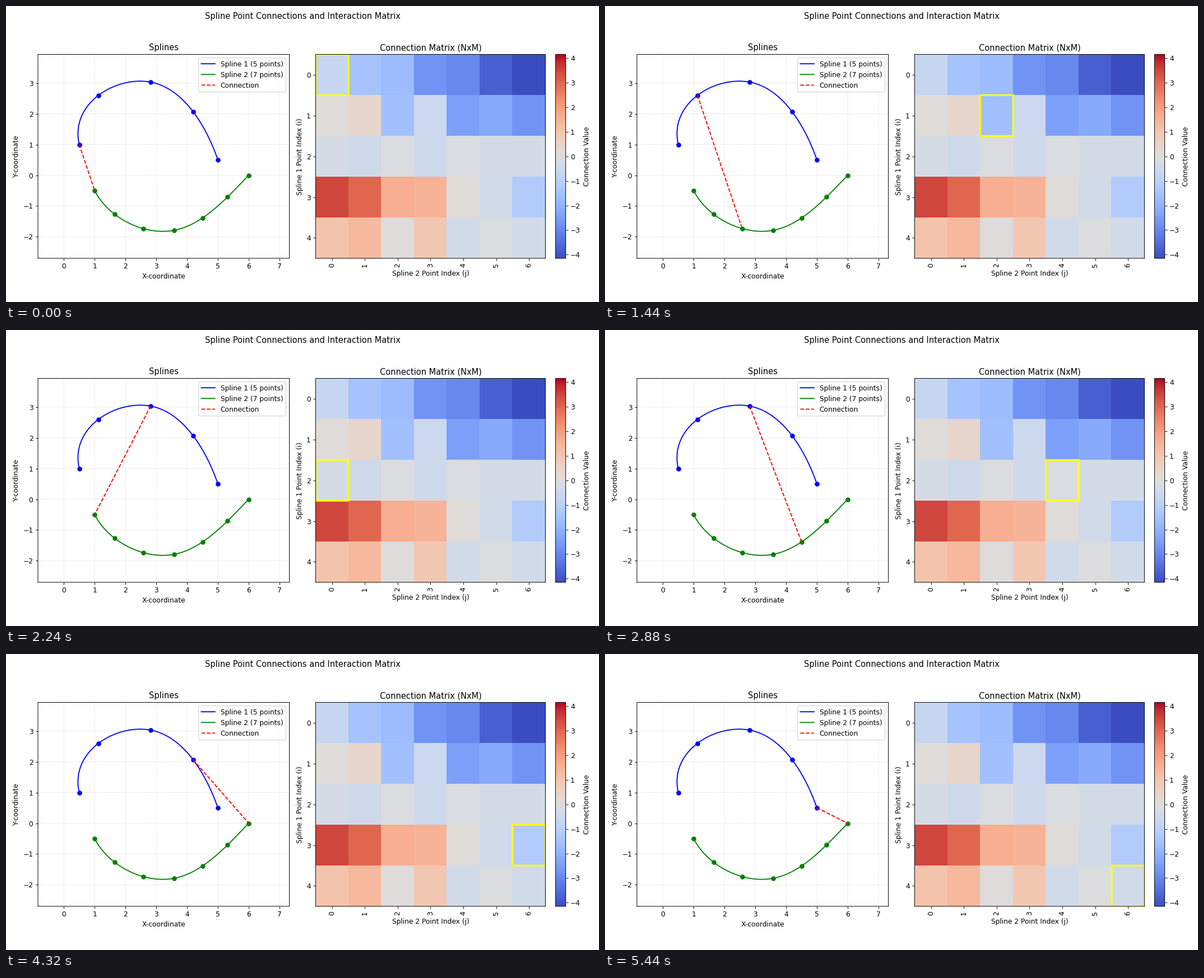
A matplotlib script that plays this animation: 1058 by 529 pixels, repeating every 5600 ms.

```python
import numpy as np
import matplotlib.pyplot as plt
from matplotlib.animation import FuncAnimation
from matplotlib.patches import Rectangle

W, H = 1058, 529
plt.rcParams.update({
    "font.family": "DejaVu Sans",
    "path.snap": False,
    "axes.titlesize": 11.95,
    "figure.titlesize": 11.95,
})


def make_spline(*knots):
    """Cubic through five evenly spaced points with one inner knot."""
    def basis(t):
        return np.stack([t**0, t, t**2, t**3,
                         np.maximum(t - 0.5, 0)**3], axis=1)

    coef = np.linalg.solve(basis(np.linspace(0, 1, 5)), np.array(knots))
    return lambda n: basis(np.linspace(0, 1, n)) @ coef


def add_axes(left, width):
    top, height = 86.5, 364.4
    return fig.add_axes([left / W, 1 - (top + height) / H,
                         width / W, height / H])


spline1 = make_spline((0.5, 1), (1.124, 2.6), (2.816, 3.03),
                      (4.195, 2.067), (5, 0.5))
spline2 = make_spline((1, -0.5), (2.09, -1.545), (3.58, -1.79),
                      (4.92, -1.067), (6, 0))
N, M = 5, 7
pts1, pts2 = spline1(N), spline2(M)

# Each matrix row is a slope plus an alternating ripple
j = np.arange(M)
ripple = -np.cos(np.pi * j) * np.sin(np.pi * (j + 0.5) / 6)
rows = [(-2.52, -0.60, -0.21), (-1.31, -0.54, 0.84), (-0.25, 0.01, -0.18),
        (1.14, -0.81, 0.36), (0.36, -0.28, 0.60)]
matrix = np.array([mean + slope * (j - 3) + amp * ripple
                   for mean, slope, amp in rows])

fig = plt.figure(figsize=(12, 6), dpi=W / 12)
fig.suptitle("Spline Point Connections and Interaction Matrix")

# Left panel: the two curves
ax = add_axes(57, 448.6)
for curve, pts, color, label in [
        (spline1, pts1, "blue", "Spline 1 (5 points)"),
        (spline2, pts2, "green", "Spline 2 (7 points)")]:
    ax.plot(*curve(200).T, color=color, label=label)
    ax.plot(*pts.T, "o", color=color)
link, = ax.plot([], [], "r--", label="Connection")
ax.set_xlim(-0.84, 7.32)
ax.set_ylim(-2.70, 3.93)
ax.set_xticks(range(8))
ax.set_yticks(range(-2, 4))
ax.set(title="Splines", xlabel="X-coordinate", ylabel="Y-coordinate")
ax.grid(True, linestyle=":", alpha=0.6)
ax.legend(loc="upper right")

# Right panel: the matrix and its colour scale
mat_ax = add_axes(552.4, 410)
image = mat_ax.imshow(matrix, cmap="coolwarm", vmin=-4.15, vmax=4.15,
                      aspect="auto", interpolation="nearest")
mat_ax.set_xticks(range(M))
mat_ax.set_yticks(range(N))
mat_ax.tick_params(axis="x", rotation=90)
mat_ax.set(title="Connection Matrix (NxM)",
           xlabel="Spline 2 Point Index (j)",
           ylabel="Spline 1 Point Index (i)")
box = Rectangle((-0.5, -0.5), 1, 1, fill=False, edgecolor="yellow",
                linewidth=2.5)
mat_ax.add_patch(box)
bar = fig.colorbar(image, cax=add_axes(980.4, 18.2))
bar.set_ticks(range(-4, 5))
bar.set_label("Connection Value")


def update(k):
    row, col = divmod(k, M)
    link.set_data(*np.array([pts1[row], pts2[col]]).T)
    box.set_xy((col - 0.5, row - 0.5))
    return link, box


anim = FuncAnimation(fig, update, frames=N * M, interval=160,
                     repeat=True, repeat_delay=0)
plt.show()
```
